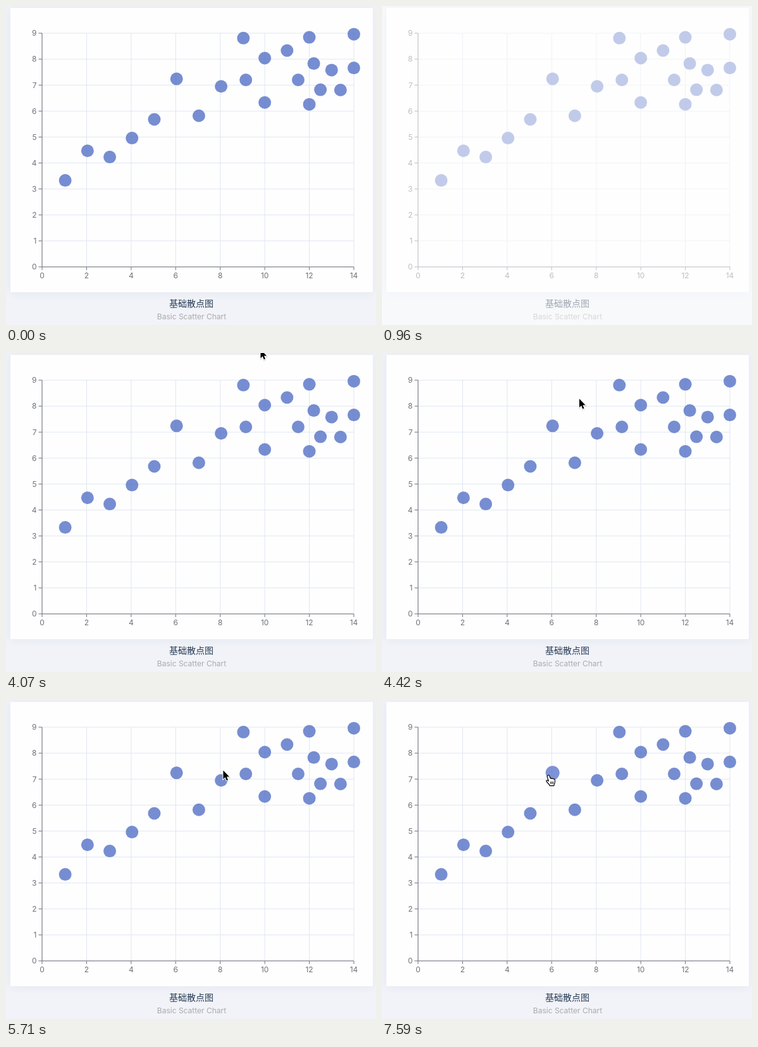
Write an HTML page that moves like this. It is 585 px wide and 505 px high and loops after 8 s.

```html
<!DOCTYPE html>
<html lang="zh">
<head>
<meta charset="utf-8">
<style>
  html, body { margin: 0; width: 100%; height: 100%; overflow: hidden; background: #fefefe; }
  svg { display: block; width: 585px; height: 505px; }
  .grid { stroke: #e0e6f1; }
  .axis { stroke: #6e7079; }
  .tick { font: 12px Inter, "Liberation Sans", sans-serif; fill: #6e7079; }
  .title { font: 14px "Noto Sans CJK SC", "Noto Sans CJK", sans-serif; fill: #293c55; }
  .subtitle { font: 12px Inter, "Liberation Sans", sans-serif; fill: #aaa; }
</style>
</head>
<body>
<svg viewBox="0 0 585 505">
  <defs>
    <filter id="blur" x="-10%" y="-10%" width="120%" height="120%"><feGaussianBlur stdDeviation="9"/></filter>
    <filter id="soft" x="-50%" y="-50%" width="200%" height="200%">
      <feDropShadow dx="0" dy="1" stdDeviation=".7" flood-opacity=".3"/>
    </filter>
  </defs>
  <rect width="585" height="505" fill="#fefefe"/>
  <g id="page">
    <rect width="585" height="505" fill="#f1f3f9"/>
    <rect x="7" y="3" width="573" height="450" fill="#202040" opacity=".06" filter="url(#blur)"/>
    <rect x="7" y="3" width="573" height="450" rx="1" fill="#fefefe"/>
    <g id="chart"></g>
    <g id="dots" fill="#5470c6" fill-opacity=".8"></g>
    <text class="title" x="293" y="476" text-anchor="middle">基础散点图</text>
    <text class="subtitle" x="293.5" y="496" text-anchor="middle">Basic Scatter Chart</text>
  </g>
  <g id="cursor">
    <path id="arrow" transform="translate(1 1) scale(.88)" d="M0 0V15.5L3.6 12.2L6 18L8.6 16.9L6.2 11.3H11Z" stroke="#fff" stroke-width="2.4" paint-order="stroke" filter="url(#soft)"/>
    <g id="hand" transform="translate(-5 -1.5)" stroke="#000" stroke-width="1.1" stroke-linejoin="round" filter="url(#soft)">
      <path fill="#fff" d="M3 1.5C4 .5 5.5 1 6 2.5L7.3 6.3C8 5.6 9.4 5.7 9.8 6.7C10.6 6 12 6.2 12.3 7.3C13.2 6.8 14.4 7.3 14.4 8.8V11.5C14.4 13.5 13 14.5 12.8 17.5H6.3C5.8 15.5 2.5 13 1 10.6C.4 9.5 1.7 8.6 2.8 9.2L4.4 10.5L2.4 3.8C2.1 2.8 2.2 2 3 1.5Z"/>
      <path fill="none" stroke-width=".9" d="M7.6 11V15M9.6 11V15M11.6 11V15"/>
    </g>
  </g>
</svg>
<script>
const LOOP = 8000, STEP = 58;
const byId = id => document.getElementById(id);
const clamp = v => Math.max(0, Math.min(1, v));
const mix = (a, b, p) => a + (b - a) * p;
const scaleX = v => mix(57, 550, v / 14);
const scaleY = v => mix(413, 43, v / 9);

function add(parent, tag, attrs, text = '') {
  const el = document.createElementNS('http://www.w3.org/2000/svg', tag);
  for (const key in attrs) el.setAttribute(key, attrs[key]);
  el.textContent = text;
  return parent.appendChild(el);
}

const chart = byId('chart');
const line = (cls, x1, y1, x2, y2) => add(chart, 'line', { class: cls, x1, y1, x2, y2 });
const label = (x, y, anchor, text) => add(chart, 'text', { class: 'tick', x, y, 'text-anchor': anchor }, text);

for (let v = 0; v <= 14; v += 2) {
  const x = scaleX(v);
  line('grid', x, 43, x, 413);
  line('axis', x, 413, x, 418);
  label(x, 430.6, 'middle', v);
}
for (let v = 0; v <= 9; v++) {
  const y = scaleY(v);
  line('grid', 57, y, 550, y);
  line('axis', 51.5, y, 57, y);
  label(48.5, y + 4.3, 'end', v);
}
line('axis', 57, 43, 57, 413);
line('axis', 57, 413, 550, 413);

const dot = (x, y) => add(byId('dots'), 'circle', { cx: scaleX(x), cy: scaleY(y), r: 10 });

// One dot per whole x from 1 to 14, then the lower cluster on the right
const rising = [3.33, 4.47, 4.23, 4.96, 5.68, 7.24, 5.82, 6.95, 8.81, 8.04, 8.33, 8.84, 7.58, 8.96]
  .map((y, i) => dot(i < 9 ? i + 1.04 : i + 1, y));
[[9.15, 7.2], [10, 6.33], [11.5, 7.2], [12, 6.26], [12.2, 7.83], [12.5, 6.82], [13.4, 6.81], [14, 7.66]]
  .forEach(([x, y]) => dot(x, y));
const hovered = rising[5];

const easeOut = p => 1 - (1 - p) ** 1.7;
const easeInOut = p => p * p * (3 - 2 * p);
const moves = [
  { at: 4070, ms: 750, from: [401.5, -6.5], to: [263, 113], ease: easeOut, lift: 0 },
  { at: 4822, ms: 406, from: [263, 113], to: [267, 119.5], ease: easeInOut, lift: 0 },
  { at: 5592, ms: 348, from: [267, 119.5], to: [558, 85], ease: easeInOut, lift: 0 },
  { at: 6840, ms: 520, from: [580.5, 96], to: [264, 119.5], ease: easeOut, lift: 35 }
];

function pointerAt(t) {
  const { at, ms, from, to, ease, lift } = moves.findLast(m => m.at <= t) || moves[0];
  const elapsed = Math.floor((t - at + 4) / STEP) * STEP;
  const p = ease(clamp(elapsed / ms));
  return [mix(from[0], to[0], p), mix(from[1], to[1], p) - lift * Math.sin(Math.PI * p)];
}

const show = (id, on) => { byId(id).style.display = on ? '' : 'none'; };

function render(t) {
  const fade = t < 500 ? 1 : t < 680 ? 0 : clamp((Math.floor((t - 680) / 71) + 1) / 9);
  byId('page').setAttribute('opacity', fade);

  const pointing = t >= 7360;
  show('cursor', (t >= 4070 && t < 6000) || t >= 6840);
  show('arrow', !pointing);
  show('hand', pointing);
  byId('cursor').setAttribute('transform', `translate(${pointerAt(t)})`);

  const grow = clamp((t - 7330) / 250);
  hovered.setAttribute('r', 10 + grow);
  hovered.setAttribute('fill', grow > 0 ? '#5c78ca' : '#5470c6');
}

const start = performance.now();
function tick(now) {
  render(Math.max(0, now - start) % LOOP);
  requestAnimationFrame(tick);
}
render(0);
requestAnimationFrame(tick);
</script>
</body>
</html>
```
